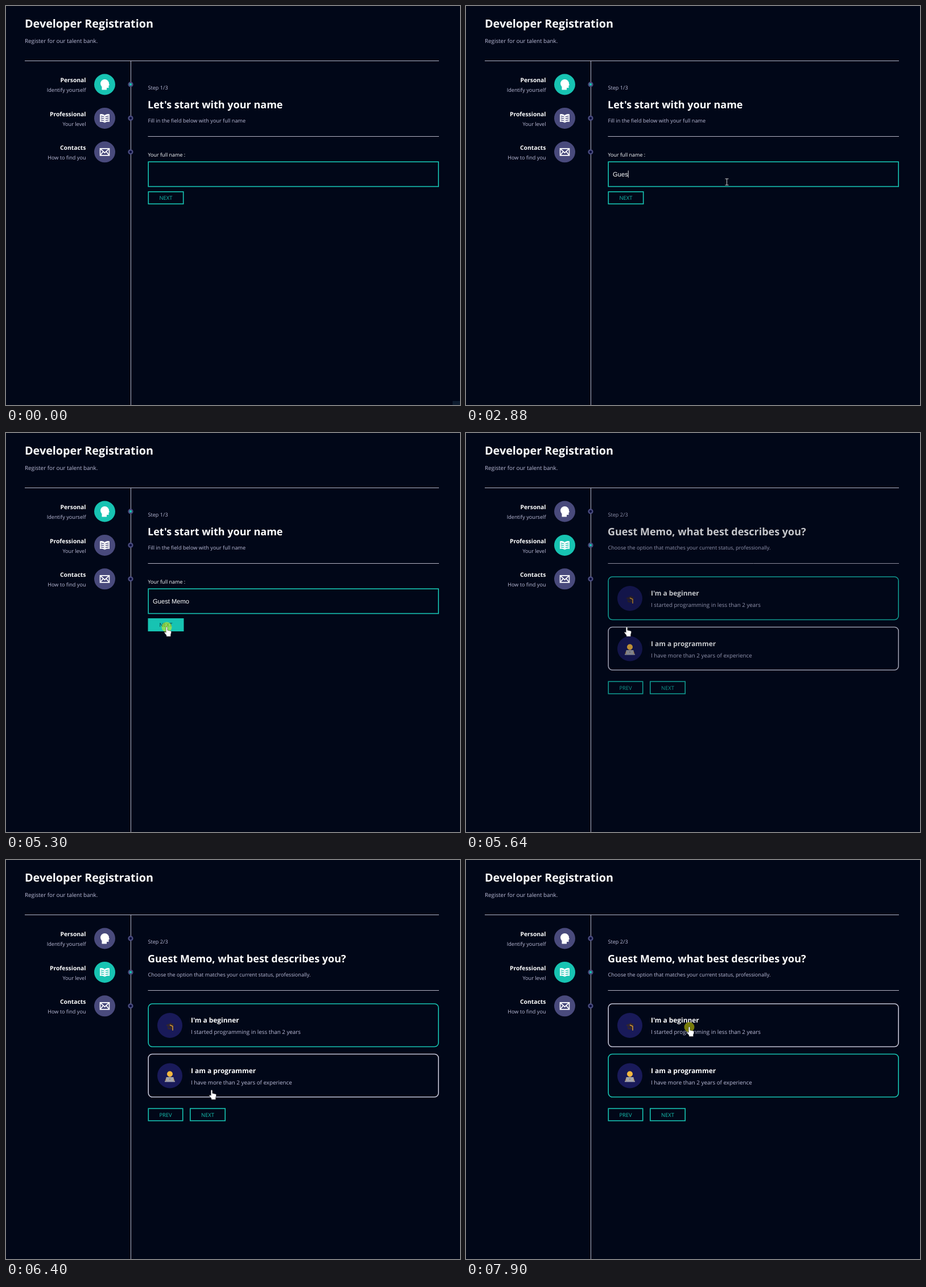
An HTML page for the animation above (8000 ms loop, 798 by 702 pixels).

```html
<!DOCTYPE html>
<html lang="en">
<head>
<meta charset="utf-8">
<title>Developer Registration</title>
<style>
  html, body { margin: 0; width: 100%; height: 100%; overflow: hidden; background: #010718; }
  svg { display: block; }
  text { font-family: "Open Sans", "Noto Sans", sans-serif; fill: #bcbcd8; white-space: pre; text-rendering: geometricPrecision; }
  .bold { font-weight: 700; fill: #fff; }
  .label { fill: #fff; }
  .typed { font-family: "Liberation Sans", Arial, sans-serif; fill: #fff; }
  .end { text-anchor: end; }
  .rule { stroke: #b5b4c4; }
  .box { fill: none; stroke: #17c3b2; stroke-width: 1.6; }
  .caption { fill: #17c3b2; text-anchor: middle; }
  .hover .box { fill: #17c3b2; }
  .hover .caption { fill: #0a2b3c; }
  .card { fill: none; stroke: #c4c3d4; stroke-width: 1.6; }
  .card.on { stroke: #17c3b2; }
  .disc { fill: #494a7c; }
  .dot { fill: #02083a; stroke: #494a7c; stroke-width: 2.5; }
  .on .disc, .on .dot { fill: #17c3b2; }
  .lines { fill: none; stroke: #494a7c; stroke-width: 1.3; }
  .on .lines { stroke: #17c3b2; }
</style>
</head>
<body>
<svg id="stage" width="798" height="702" viewBox="0 0 798 702"></svg>
<script>
const LOOP = 8000, NAME = "Guest Memo", SMALL = 9.15;
const FOCUS = 1360, CLICK = 5300, STEP_TWO = 5430, PRESS = 6800, SWAP = 7000, LAST_PRESS = 7900;
const BLINK = 530, FADE = 400;

// Typing bursts: first key, gap, number of keys
const KEYS = [[2550, 110, 4], [3080, 70, 2], [3610, 153, 4]]
  .flatMap(([first, gap, count]) => Array.from({ length: count }, (_, i) => first + gap * i));

// Places where the pointer rests or turns: time, x, y
const STOPS = [
  [300, 765, 690], [1200, 458.5, 309.5], [4600, 458.5, 309.5], [5250, 282.5, 341],
  [5640, 282.5, 341], [6050, 314, 556], [6400, 361.5, 404.5], [SWAP, 364, 411], [7770, 392.5, 293.5]
];

const text = (x, y, size, str, cls = "") =>
  `<text x="${x}" y="${y}" font-size="${size}" class="${cls}">${str}</text>`;

const button = (id, x, y, w, str) =>
  `<g id="${id}"><rect class="box" x="${x + .8}" y="${y + .8}" width="${w - 1.6}" height="21.4"/>
  ${text(x + w / 2, y + 15.3, 9.4, str, "caption")}</g>`;

const head = (step, title, note) =>
  text(249.5, 147, SMALL, `Step ${step}/3`) + text(249, 179.6, 18, title, "bold") +
  text(249.5, 204.8, SMALL, note) + `<path class="rule" d="M249.5 229.5H761"/>`;

const card = ([title, note, icon], i) =>
  `<g transform="translate(250 ${253 + 88.5 * i})">
    <rect id="card${i}" class="card" x=".2" width="510" height="75.5" rx="7"/>
    <circle cx="38" cy="38" r="22" fill="#191a59"/><g transform="translate(38 38)">${icon}</g>
    ${text(75, 33.3, 11.9, title, "bold")}${text(75, 53, 9.83, note)}
  </g>`;

const side = ([title, note, icon], i) =>
  `<g id="side${i}" transform="translate(173.5 ${138 + 59.4 * i})">
    ${text(-33, -3.8, 10.35, title, "bold end")}${text(-33, 13.4, SMALL, note, "end")}
    <circle class="disc" r="18.5"/><circle class="dot" cx="45.5" r="3.4"/>${icon}
  </g>`;

const person = `<g fill="#fff"><circle cy="-1.5" r="7.5"/><path d="M-5 2V9.500H3.500V6H7V2L8.500 1L6-4Z"/></g>`;
const page = `<path fill="#fff" d="M0-5.500Q4-8 8.500-7V6.500Q4 5.500 0 8Z"/>
  <path class="lines" d="M7-3.800L1.500-2.600M7-.4L1.500.8M7 3L1.500 4.200"/>`;
const book = `${page}<g transform="scale(-1 1)">${page}</g>`;
const mail = `<path fill="none" stroke="#fff" stroke-width="1.7" d="M-8-6H8V6H-8ZL0 1.500L8-6M-8 6L-2.500-.8M8 6L2.500-.8"/>`;
const cap = `<path fill="#33262f" d="M-7-.5L2-4.500L8-1L-1 4ZM-4 2V6Q0 9 4 6V2Z"/>
  <path fill="none" stroke="#d99a2b" stroke-width="1.5" d="M0-.8L5 1.500V9"/>`;
const coder = `<path fill="#e0a33a" d="M-8 9Q-8 2 0 2T8 9Z"/><circle cy="-3" r="5" fill="#f4b73f"/>
  <path fill="#a5a6ad" d="M-6.500 2.500H6.500V9H9V11H-9V9H-6.500Z"/><circle cy="6" r="1.1" fill="#77787f"/>`;

const sides = [
  ["Personal", "Identify yourself", person],
  ["Professional", "Your level", book],
  ["Contacts", "How to find you", mail]
];
const cards = [
  ["I'm a beginner", "I started programming in less than 2 years", cap],
  ["I am a programmer", "I have more than 2 years of experience", coder]
];

document.getElementById("stage").innerHTML = `
  <path class="rule" d="M33 96.5H761M219.5 97V702"/>
  ${text(33, 37.7, 19.75, "Developer Registration", "bold")}
  ${text(33, 64.6, 9.83, "Register for our talent bank.")}
  ${sides.map(side).join("")}
  <g id="step1">
    ${head(1, "Let's start with your name", "Fill in the field below with your full name")}
    ${text(249.5, 264.8, 9, "Your full name :", "label")}
    <rect class="box" x="250.2" y="274.2" width="510" height="43.4"/>
    <g id="typed">${text(258, 300, 11.2, "", "typed")}</g>
    <rect id="caret" y="289.5" width="1" height="12.5" fill="#ddd"/>
    ${button("next", 249.5, 326, 63, "NEXT")}
  </g>
  <g id="step2">
    ${head(2, NAME + ", what best describes you?", "Choose the option that matches your current status, professionally.")}
    ${cards.map(card).join("")}
    ${button("prev", 249.5, 436.5, 62, "PREV")}
    ${button("next2", 323, 436.5, 63, "NEXT")}
  </g>
  <rect id="corner" x="785" y="695" width="13" height="7" fill="#0e1c2f"/>
  <g id="pointer">
    <circle id="glow" cy=".5" r="9" fill="#ff0" opacity=".47"/>
    <path id="arrow" fill="#fff" stroke="#111" stroke-width=".6" d="M0 0V15L3.500 12L6 17.500L8 16.500L6 11H10.500Z"/>
    <path id="beam" fill="none" stroke="#ccc" d="M-3-5.500H3M0-5.500V5.500M-3 5.500H3"/>
    <path id="hand" fill="#fff" stroke="#222" stroke-width=".5"
      d="M-1.300 1Q0-1 1.300 1V6L7 7.300Q8.500 8 8 10L7 14V17H-.5V15L-4 10.500Q-4.500 8.500-3 9L-1.300 10Z"/>
  </g>`;

const $ = id => document.getElementById(id);
const show = (id, on) => { $(id).style.display = on ? "" : "none"; };
const between = (t, a, b) => t >= a && t < b;

function pointerAt(t) {
  const i = STOPS.findIndex(stop => stop[0] > t);
  if (i < 1) return STOPS.at(i).slice(1);
  const [a, x, y] = STOPS[i - 1], [b, x2, y2] = STOPS[i];
  const u = (t - a) / (b - a), k = u * u * (3 - 2 * u);
  return [x + (x2 - x) * k, y + (y2 - y) * k];
}

function pointerKind(x, y, second) {
  const inside = (l, top, r, bottom) => between(x, l, r) && between(y, top, bottom);
  if (!second) return inside(249, 273, 761, 319) ? "beam" : inside(249, 326, 313, 349) ? "hand" : "arrow";
  const active = inside(249, 252, 761, 329) || inside(249, 340, 761, 418) ||
    inside(249, 436, 312, 460) || inside(323, 436, 386, 460);
  return active ? "hand" : "arrow";
}

function draw(t) {
  const second = t >= STEP_TWO;
  show("corner", t < 70);
  show("step1", !second);
  show("step2", second);
  $("side0").classList.toggle("on", !second);
  $("side1").classList.toggle("on", second);

  const pressed = KEYS.filter(k => k <= t), field = $("typed").firstChild;
  field.textContent = NAME.slice(0, pressed.length);
  $("caret").setAttribute("x", 258 + (pressed.length && field.getComputedTextLength()));
  const blinks = Math.floor((t - (pressed.at(-1) ?? FOCUS)) / BLINK);
  show("caret", between(t, FOCUS, CLICK) && blinks % 2 === 0);

  const fade = Math.min(1, Math.max(0, (t - STEP_TWO) / FADE));
  $("step2").setAttribute("opacity", 1 - (1 - fade) ** 2);
  $("card0").classList.toggle("on", t < SWAP);
  $("card1").classList.toggle("on", t >= SWAP);

  const [x, y] = pointerAt(t), kind = pointerKind(x, y, second);
  show("pointer", t >= 300);
  $("pointer").setAttribute("transform", `translate(${x} ${y})`);
  for (const k of ["arrow", "beam", "hand"]) show(k, k === kind);
  show("glow", between(t, CLICK, STEP_TWO) || between(t, PRESS, SWAP) || t >= LAST_PRESS);
  $("next").classList.toggle("hover", kind === "hand" && !second);
}

const start = performance.now();
function tick() {
  draw((performance.now() - start) % LOOP);
  requestAnimationFrame(tick);
}
tick();
</script>
</body>
</html>
```
